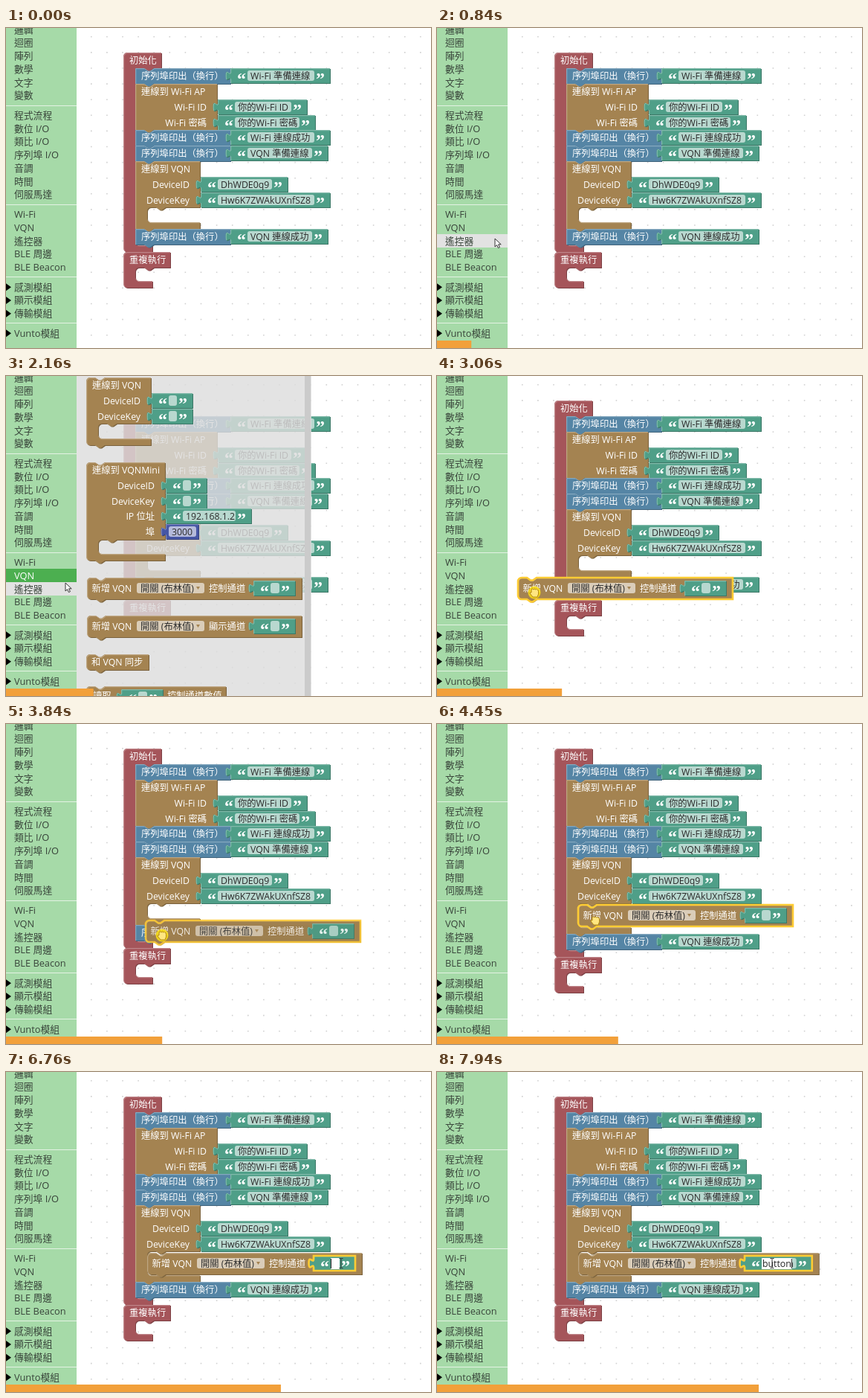
An HTML page with a canvas that plays this animation: 572x430 px, repeating every 8000 ms.

```html
<!DOCTYPE html>
<html lang="zh-Hant">
<head>
<meta charset="utf-8">
<style>
  html, body { margin: 0; width: 100%; height: 100%; overflow: hidden; background: #fff; }
  canvas { display: block; }
</style>
</head>
<body>
<canvas id="stage" width="572" height="430"></canvas>
<script>
const ctx = document.getElementById('stage').getContext('2d');
const FONT = '"Open Sans", "Noto Sans CJK TC", "Noto Sans CJK JP", sans-serif';
const LOOP = 8000, STEP = 76.8, LAST_STEP = 103;
const RED = '#a5555a', BLUE = '#5585a5', BROWN = '#a48351', TEAL = '#4f9f88', INDIGO = '#4656a5';
const YELLOW = '#fc3', FIELD = 'rgba(255,255,255,.6)', DARK = '#2c2c2c';
const SIDEBAR = 95, FOOT = 9, INDENT = 16;
const TIME = { open: 1300, hover: 2400, press: 2650, close: 2990, drop: 4270, select: 5240, edit: 5600 };
const CLICKS = [[1230, 1390], [TIME.press, TIME.drop], [TIME.select, 5540]];
const KEYS = [[6930, 'b'], [7130, 'u'], [7330, 't'], [7510, 't'], [7700, 'o'], [7850, 'n']];
const POINTER = [[80, 368, 436], [800, 78, 283], [950, 78, 283], [1200, 79, 268], [1700, 79, 268],
  [2100, 80, 278], [2190, 80, 278], [2480, 131, 291], [3100, 131, 291], [3400, 144, 290],
  [3840, 210, 284], [4200, 213, 264], [4500, 213, 264], [5220, 446, 260], [5540, 446, 260], [5650, 451, 257]];
const MENU = [
  ['邏輯', '迴圈', '陣列', '數學', '文字', '變數'],
  ['程式流程', '數位 I/O', '類比 I/O', '序列埠 I/O', '音調', '時間', '伺服馬達'],
  ['Wi-Fi', 'VQN', '遙控器', 'BLE 周邊', 'BLE Beacon'],
  ['感測模組', '顯示模組', '傳輸模組'],
  ['Vunto模組']
];

function label(text, x, cy, color = '#fff', align = 'left', size = 12.3) {
  ctx.font = `${size}px ${FONT}`;
  ctx.textAlign = align;
  ctx.fillStyle = color;
  ctx.fillText(text, x, cy + 4.5);
}

function box(x, y, w, h, color, r = 0) {
  ctx.fillStyle = color;
  ctx.beginPath();
  ctx.roundRect(x, y, w, h, r);
  ctx.fill();
}

function bevel(d, color, selected) {
  const path = new Path2D(d);
  ctx.save();
  ctx.translate(1, 1);
  ctx.fillStyle = color;
  ctx.fill(path);
  ctx.fillStyle = 'rgba(0,0,0,.25)';
  ctx.fill(path);
  ctx.restore();
  ctx.fillStyle = color;
  ctx.fill(path);
  ctx.save();
  ctx.clip(path);
  ctx.translate(.7, .7);
  ctx.lineWidth = 1;
  ctx.strokeStyle = 'rgba(255,255,255,.35)';
  ctx.stroke(path);
  ctx.restore();
  if (selected) {
    ctx.lineWidth = 2.6;
    ctx.strokeStyle = YELLOW;
    ctx.stroke(path);
  }
}

// A stackable block, w including its 1px shadow; slot is the height of its C-shaped opening.
function statement(x, y, w, h, color, { slot, foot = w, hat, round, selected } = {}) {
  const r = 5, corner = hat || round;
  const tab = left => `H${left + 25}l-5 3.5h-3l-5-3.5`;
  let d = corner ? `M${x} ${y + r}a5 5 0 0 1 5-5` : `M${x} ${y}`;
  if (!hat) d += `H${x + 12}l5 3.5h3l5-3.5`;
  d += `H${x + w - 1}V${y + h}`;
  if (slot) {
    const left = x + INDENT;
    d += `${tab(left)}H${left + r}a5 5 0 0 0-5 5V${y + h + slot - r}a5 5 0 0 0 5 5H${x + foot - 1}v${FOOT}`;
  }
  if (!hat) d += tab(x);
  bevel(d + (corner ? `H${x + r}a5 5 0 0 1-5-5z` : `H${x}z`), color, selected);
}

function valueShape(x, cy, w, color, selected) {
  bevel(`M${x} ${cy - 10}v4c0 8-6.5-6.5-6.5 6s6.5-2 6.5 6V${cy + 10}h${w - 1}V${cy - 10}z`, color, selected);
}

function textValue(x, cy, right, text = '', selected = false) {
  valueShape(x, cy, right - x, TEAL, selected);
  box(x + 23, cy - 7, right - x - 45, 14, FIELD, 3);
  ctx.font = 'bold 24px "Liberation Serif", serif';
  ctx.textAlign = 'center';
  ctx.fillStyle = '#fff';
  ctx.fillText('“', x + 15, cy + 12);
  ctx.fillText('”', right - 14, cy + 12);
  label(text, x + 27, cy, DARK);
}

function printRow(y, text, right) {
  statement(174, y, 129, 21, BLUE);
  label('序列埠印出（換行）', 182, y + 10);
  textValue(302, y + 10, right, text);
}

function connectBlock(x, y, w, title, rows, options) {
  statement(x, y, w, Math.round(20.8 * (rows.length + 1)), BROWN, options);
  label(title, x + 8, y + 10);
  rows.forEach(([name, right, text], i) => {
    const cy = Math.round(y + 10 + 20.8 * (i + 1));
    label(name, x + w - 15, cy, '#fff', 'right');
    if (name !== '埠') return textValue(x + w, cy, right, text);
    valueShape(x + w, cy, right - x - w, INDIGO);
    box(x + w + 4, cy - 7, right - x - w - 8, 14, FIELD, 3);
    label(text, x + w + 8, cy, DARK);
  });
}

function dropdown(x, cy) {
  box(x, cy - 7, 91, 14, FIELD, 3);
  label('開關 (布林值)', x + 5, cy, DARK);
  ctx.fillStyle = BROWN;
  ctx.fill(new Path2D(`M${x + 80} ${cy - 2}h5l-2.5 4z`));
}

const typedWidth = text => {
  ctx.font = `12.3px ${FONT}`;
  return Math.max(12, text ? ctx.measureText(text).width + 8 : 0);
};

function channelBlock(x, y, name, { text = '', selected, valueSelected } = {}) {
  const right = x + 269 + typedWidth(text), cy = y + 14;
  statement(x, y, right + 9 - x, 29, BROWN, { round: true, selected });
  label('新增 VQN', x + 6.5, cy);
  dropdown(x + 67, cy);
  label(name, x + 164, cy);
  textValue(x + 224, cy, right, text, valueSelected);
}

function grid() {
  for (let x = 114; x < 572; x += 21.1)
    for (let y = 11; y < 430; y += 21.1) box(x, y, 1.6, 1.6, '#d0d0d0');
}

function workspace(shift) {
  statement(158, 33, 52, 21, RED, { slot: 238 + shift, foot: 40, hat: true });
  label('初始化', 166, 43);
  statement(158, 301 + shift, 64, 21, RED, { slot: 18, foot: 40, hat: true });
  label('重複執行', 166, 311 + shift);
  printRow(54, 'Wi-Fi 準備連線', 437);
  connectBlock(174, 75, 111, '連線到 Wi-Fi AP', [['Wi-Fi ID', 406, '你的Wi-Fi ID'], ['Wi-Fi 密碼', 417, '你的Wi-Fi 密碼']]);
  printRow(137, 'Wi-Fi 連線成功', 437);
  printRow(158, 'VQN 準備連線', 434);
  connectBlock(174, 179, 88, '連線到 VQN', [['DeviceID', 380, 'DhWDE0q9'], ['DeviceKey', 437, 'Hw6K7ZWAkUXnfSZ8']],
    { slot: 20 + shift });
  printRow(270 + shift, 'VQN 連線成功', 434);
}

function flyout(hovered) {
  box(SIDEBAR, 0, 316, 430, 'rgba(221,221,221,.82)');
  box(402, 0, 8, 430, '#cbcbcb');
  connectBlock(108, 2, 88, '連線到 VQN', [['DeviceID', 252], ['DeviceKey', 252]], { slot: 20, round: true });
  connectBlock(108, 116, 107, '連線到 VQNMini',
    [['DeviceID', 271], ['DeviceKey', 271], ['IP 位址', 331, '192.168.1.2'], ['埠', 260, '3000']],
    { slot: 19, round: true });
  channelBlock(109, 271, '控制通道', { selected: hovered });
  channelBlock(109, 322, '顯示通道');
  statement(108, 374, 85, 21, BROWN, { round: true });
  label('和 VQN 同步', 115, 384);
  statement(108, 417, 189, 29, BROWN, { round: true });
  label('讀取', 117, 429);
  textValue(155, 431, 212);
  label('控制通道數值', 217, 429);
}

function sidebar(pointer, active) {
  box(0, 0, SIDEBAR, 430, '#a6daa8');
  let cy = 2;
  MENU.forEach((group, g) => {
    group.forEach(name => {
      const selected = active && name === 'VQN';
      const hovered = pointer.x < SIDEBAR && Math.abs(pointer.y - cy) < 8.9;
      if (selected || hovered) box(0, Math.round(cy - 9), SIDEBAR, 18, selected ? '#4caf50' : '#e2e2e2');
      label(name, 11, cy, selected ? '#fff' : '#38443a', 'left', 12.8);
      if (g > 2) {
        ctx.fillStyle = '#000';
        ctx.fill(new Path2D(`M0 ${cy - 5}l7 5-7 5z`));
      }
      cy += 17.75;
    });
    if (g < 4) box(0, Math.round(cy - 5), SIDEBAR, 1, '#e4f2e4');
    cy += 8.9;
  });
}

function pointerAt(t) {
  const next = POINTER.findIndex(key => key[0] > t);
  if (next <= 0) {
    const [, x, y] = POINTER.at(next);
    return { x, y };
  }
  const [t0, x0, y0] = POINTER[next - 1], [t1, x1, y1] = POINTER[next];
  const u = (t - t0) / (t1 - t0), k = u * u * (3 - 2 * u);
  return { x: x0 + (x1 - x0) * k, y: y0 + (y1 - y0) * k };
}

function drawPointer({ x, y }, t) {
  if (CLICKS.some(([from, to]) => t >= from && t < to)) {
    ctx.fillStyle = 'rgba(250,222,20,.85)';
    ctx.beginPath();
    ctx.arc(x, y, 8.5, 0, 7);
    ctx.fill();
  }
  ctx.save();
  ctx.translate(x, y);
  ctx.lineWidth = 1;
  if (t > 5150) {
    ctx.strokeStyle = t < TIME.edit ? '#fff3a0' : '#333';
    ctx.stroke(new Path2D('M-2.5-6.5h2l.5.5.5-.5h2M0-6V6M-2.5 6.5h2L0 6l.5.5h2'));
  } else {
    const hand = t > TIME.hover, pressed = hand && t >= TIME.press;
    const shape = new Path2D(hand
      ? 'M-4 0v-4q1.5-2 3 0q1-2 2.5 0q1.5-1.5 2.5.5q1.5-.5 1.5 1.5v4l-1.5 4h-6l-4-5q0-2 2-1z'
      : 'M0 0v11l2.6-2.4 1.8 4 2-.9-1.8-3.9h3.6z');
    ctx.fillStyle = pressed ? '#ffe680' : '#fff';
    ctx.strokeStyle = pressed ? '#b58a10' : '#333';
    ctx.fill(shape);
    ctx.stroke(shape);
  }
  ctx.restore();
}

function ripple(age) {
  if (age < 0 || age > 150) return;
  ctx.lineWidth = 4;
  ctx.strokeStyle = `rgba(136,136,136,${1 - age / 170})`;
  ctx.beginPath();
  ctx.arc(210, 246, 4 + age / 10, 0, 7);
  ctx.stroke();
}

function editor(text, t) {
  const width = typedWidth(text) - 8;
  box(437, 250, Math.max(12, width + 2), 15, '#fff');
  label(text, 438, 257.5, '#222');
  const lastKey = KEYS.filter(key => key[0] <= t).pop();
  const since = t - (lastKey ? lastKey[0] : TIME.edit);
  if (since % 1000 < 500) box(text ? 438 + width : 437, 251, 1, 13, '#222');
}

function draw(now) {
  const step = Math.min(LAST_STEP, Math.floor((now % LOOP + 15) / STEP));
  const t = step * STEP, pointer = pointerAt(t);
  const open = t >= TIME.open && t < TIME.close, dropped = t >= TIME.drop;
  const text = KEYS.filter(key => key[0] <= t).map(key => key[1]).join('');

  box(0, 0, 572, 430, '#fff');
  grid();
  workspace(dropped ? 12 : 0);
  if (dropped) {
    const valueSelected = t >= TIME.select;
    channelBlock(190, 243, '控制通道', { text, selected: !valueSelected, valueSelected });
    ripple(t - TIME.drop);
  } else if (t >= TIME.close) {
    ctx.globalAlpha = t > 3200 ? .85 : 1;
    channelBlock(pointer.x - 22, pointer.y - 20, '控制通道', { selected: true });
    ctx.globalAlpha = 1;
  }
  if (open) flyout(t >= TIME.hover);
  sidebar(pointer, open);
  if (t >= TIME.edit) editor(text, t);
  drawPointer(pointer, t);
  box(0, 420, step * 4.204, 10, '#f2a03a');
}

const start = performance.now();
function tick() {
  draw(performance.now() - start);
  requestAnimationFrame(tick);
}
tick();
</script>
</body>
</html>
```
